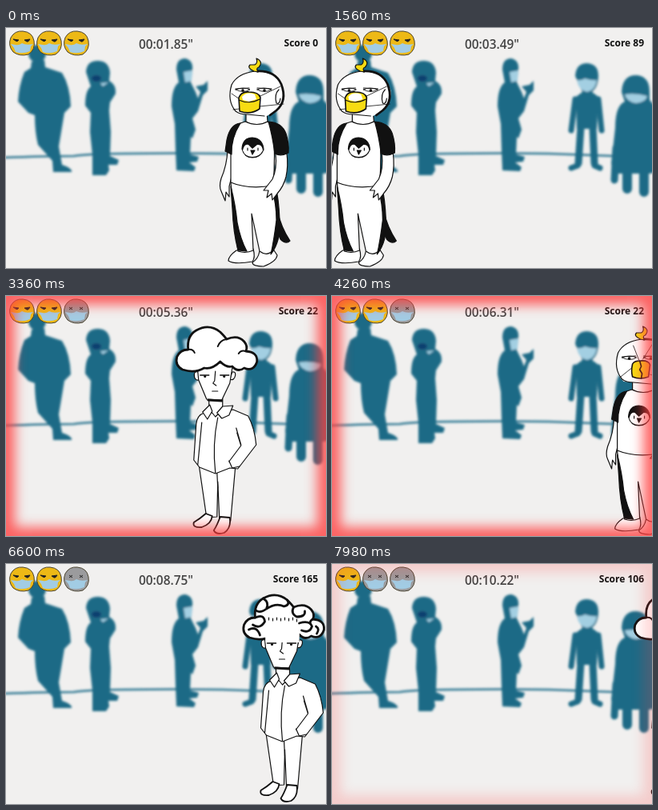
An HTML page for the animation above (8000 ms loop, 400 by 300 pixels).

```html
<!DOCTYPE html>
<html lang="en">
<head>
<meta charset="utf-8">
<title>Mask game</title>
<style>
  html, body { margin: 0; width: 100%; height: 100%; overflow: hidden; background: #f1f0ef; }
  svg { position: absolute; left: 0; top: 0; display: block; }
  #alarm { position: absolute; left: 0; top: 0; width: 400px; height: 300px; opacity: 0;
    box-shadow: inset 0 0 15px 11px rgba(255, 62, 62, .8); }
  text { font-family: "Open Sans", "Noto Sans", sans-serif; }
  .ink { fill: #fff; stroke: #111; stroke-width: 1.2; stroke-linejoin: round; stroke-linecap: round; }
  .line { fill: none; }
  .black { fill: #111; }
  .yellow { fill: #f7dc12; }
  .bold { stroke-width: 2.8; }
  .limb { fill: none; stroke: #1c6a86; stroke-linecap: round; stroke-linejoin: round; }
  .pale { fill: #a3cfe2; }
</style>
</head>
<body>
<svg width="400" height="300" viewBox="0 0 400 300">
  <defs>
    <filter id="soft" x="-5%" y="-5%" width="110%" height="110%"><feGaussianBlur stdDeviation="1.4"/></filter>

    <g id="birdBody" class="ink">
      <!-- tail, left arm -->
      <path class="black" d="M339 228 Q344 250 355 266 Q350 271 343 264 L337 250Z"/>
      <path d="M277 153 Q276 172 269 188 Q266 198 269 204 L274 216 L275 205 L279 211 L279 198 Q284 180 286 157Z"/>
      <!-- trousers, feet -->
      <path d="M288 278 Q278 285 278 291 Q286 296 308 292 Q312 287 309 276Z"/>
      <path d="M317 279 Q315 289 308 293 Q308 298 322 298 Q338 292 339 284 L333 275Z"/>
      <path d="M281 193 L284 228 L290 279 Q300 282 309 278 L307 232 L317 279 Q326 286 334 278 Q343 245 337 194Z"/>
      <path class="black" d="M281 198 Q287 222 289 243 Q293 264 301 279 L290 278 Q284 255 283 226Z"/>
      <path class="black" d="M332 198 Q338 220 338 240 Q335 265 331 283 Q344 266 342 240 Q341 214 337 198Z"/>
      <!-- shirt, right arm -->
      <path d="M300 105 L300 117 Q314 126 327 117 L326 105Z"/>
      <path d="M299 117 Q286 120 281 130 L281 193 Q302 202 334 197 Q337 160 334 122 L327 117 Q314 124 299 117Z"/>
      <path d="M337 157 Q339 176 333 189 L322 203 L328 203 L326 212 L332 207 L333 215 L339 207 Q347 198 350 186 Q353 172 351 157Z"/>
      <path class="black" d="M293 119 Q280 120 276 140 L274 154 L282 158 Q281 138 293 119Z"/>
      <path class="black" d="M328 117 Q345 118 350 132 Q354 145 353 156 Q344 161 336 157 Q333 134 328 117Z"/>
      <!-- chick badge -->
      <path class="black" d="M295 151 Q296 137 308 137 Q321 138 322 152 Q318 162 308 162 Q298 162 295 151Z"/>
      <path stroke="none" d="M296 153 Q298 144 303 146 L308 151 L314 146 Q320 145 321 153 Q317 161 308 161 Q299 161 296 153Z"/>
      <path class="black" d="M302 150 v3 M315 150 v3 M306 153 L311 153 L308 158Z"/>
    </g>

    <g id="birdHead" class="ink">
      <path stroke="none" d="M311 54 Q286 56 279 78 Q278 98 289 107 L326 110 Q350 99 348 78 Q341 54 311 54Z"/>
      <path class="line" d="M311 54 Q289 57 282 71 Q276 91 287 104 Q292 108 301 108 L323 110"/>
      <path class="line bold" d="M314 54 Q336 53 344 70 Q352 91 338 103 L330 109" />
      <path class="line" d="M341 77 Q335 83 338 94 Q342 96 343 88"/>
      <path class="yellow" d="M310 54 Q301 50 305 46 L311 46 Q315 44 313 38 Q322 42 316 49 Q312 50 315 55Z"/>
      <path stroke-width=".9" d="M287 77 Q296 73 305 77 Q297 82 287 77Z M314 77 Q322 73 332 77 Q323 82 314 77Z"/>
      <path class="line" d="M287 76 L304 75 M314 75 L332 76"/>
      <circle class="black" cx="296" cy="78" r="1.2"/><circle class="black" cx="323" cy="78" r="1.2"/>
    </g>

    <g id="masked" class="ink">
      <use href="#birdBody"/><use href="#birdHead"/>
      <path class="line" stroke-width=".8" d="M292 89 L282 82 M292 101 L284 102 M316 86 L343 73 M317 98 L347 95"/>
      <path class="yellow" stroke-width="1.6" d="M291 87 Q294 79 304 80 Q316 80 318 87 L317 101 Q306 109 292 104Z"/>
      <path d="M295 86 Q301 79 311 83 L313 89 L304 92 L296 90Z" stroke="none"/>
      <path class="line" d="M291 90 Q304 96 317 89"/>
    </g>

    <g id="bare" class="ink">
      <use href="#birdBody"/><use href="#birdHead"/>
      <path class="line" stroke-width=".8" d="M301 62 L308 80 M325 60 L313 79 M299 90 L284 102 M322 98 L340 104"/>
      <path class="yellow" stroke-width="1.6" d="M300 85 Q302 81 310 81 Q320 80 322 86 L320 101 Q310 105 300 101 Q298 94 300 85Z"/>
      <path class="line" stroke-width="1.6" d="M309 81 L311 88 L309 92 L312 97 L311 103"/>
    </g>

    <g id="manBody" class="ink" stroke-width="1">
      <!-- trousers, shoes -->
      <path d="M241 208 L251 277 L264 276 L265 232 L267 278 L281 281 L287 213Z"/>
      <path class="line" d="M264 220 L265 240"/>
      <path stroke-width="1.8" d="M250 272 Q242 279 235 283 Q233 290 245 289 Q257 285 258 275Z"/>
      <path stroke-width="1.8" d="M268 276 Q264 287 260 293 Q263 299 273 296 Q282 290 280 277Z"/>
      <!-- jacket -->
      <path d="M248 146 Q239 149 238 160 L235 205 L242 214 L262 222 L280 215 L290 216 L313 186 Q311 165 303 150 L284 142 L268 146Z"/>
      <path class="line" d="M245 158 L240 211 M289 171 L294 187 L279 207 M279 206 L283 215 L292 213 M265 152 Q258 185 262 221 M294 186 L288 165"/>
      <!-- neck, collar, face -->
      <path d="M254 128 L254 141 L262 151 L271 142 L271 128Z"/>
      <path d="M255 136 L246 145 L252 154 L258 144Z M271 138 L284 137 L279 149 L270 153 L264 146Z"/>
      <path d="M241 95 Q234 93 236 102 Q238 107 243 104Z M283 95 Q289 94 286 102 Q284 106 280 104Z"/>
      <path d="M239 84 L241 105 L251 129 L270 130 L280 109 L284 84Z"/>
      <path class="line bold" d="M253 130 L270 131"/>
      <path class="line" d="M262 94 L261 106 L259 109 L263 112 M258 119 L265 119"/>
      <path class="line" stroke-width="1.4" d="M243 99 L254 99 M268 99 L279 99"/>
      <circle class="black" cx="249" cy="100.500" r="1"/><circle class="black" cx="273" cy="100.500" r="1"/>
    </g>

    <path id="cloud" d="M221 92 Q211 87 214 76 Q218 67 228 67 Q226 50 238 43 Q254 34 268 45 Q274 51 276 54 Q290 48 298 57 Q303 63 300 69 Q315 70 314 82 Q310 95 298 90 Q290 96 283 88 Q276 90 268 82 Q258 92 248 90 Q236 97 221 92Z"/>
    <g id="plain" class="ink">
      <use href="#manBody"/><use href="#cloud" class="ink bold"/>
      <path class="line" stroke-width="2" d="M228 67 Q234 66 236 71 M276 54 Q268 55 265 63 M300 69 Q294 67 291 72"/>
    </g>
    <g id="curly" class="ink">
      <use href="#manBody"/><use href="#cloud" class="ink bold"/>
      <path stroke="none" d="M239 68 L284 68 L283 98 L241 98Z"/>
      <path class="line bold" d="M228 67 Q239 62 240 72 Q234 82 225 76 M238 43 Q246 48 242 56 Q234 62 229 58 M242 56 Q254 48 264 53 Q272 51 268 45 M276 54 Q272 62 280 66 Q291 66 290 59 M283 74 Q296 70 299 78 Q296 87 286 83 M300 69 Q294 72 299 78 M220 82 Q230 77 234 89 M304 78 Q309 81 305 87"/>
      <path class="line" d="M240 69 v3 M245 67 v3 M250 68 v3 M255 67 v3 M260 68 v3 M265 67 v3 M270 68 v3 M275 67 v3 M280 69 v3"/>
    </g>

    <g id="life">
      <path stroke="#4a4330" d="M-14 -7 Q-9 -16 1 -15 Q13 -14 15 -3 Q17 8 8 14 Q-3 17 -11 11 Q-18 3 -14 -7Z"/>
      <path fill="#a2cce4" d="M-14 1 L-8 2 Q-4 3 0 0 Q5 3 14 1 L11 4 L10 10 Q1 14 -8 11 L-10 6Z"/>
    </g>
    <path id="awake" fill="#222" stroke="#222" d="M-11 -5 L-4 -4 Q-6 -1 -8 -3Z M3 -4 L10 -5 Q8 -1 6 -2Z"/>
    <path id="out" fill="none" stroke="#222" d="M-9 -5 l4 3 m0 -3 l-4 3 M4 -5 l4 3 m0 -3 l-4 3"/>
  </defs>

  <rect width="400" height="300" fill="#f1f0ef"/>
  <g filter="url(#soft)" fill="#1c6a86">
    <path fill="none" stroke="#2b7590" stroke-width="2.6" d="M-4 162 Q50 160 85 160 Q105 157 150 157 Q215 156 270 157 L352 160"/>
    <!-- leaning -->
    <circle cx="39" cy="32" r="11"/>
    <path d="M32 42 L31 50 L23 55 Q16 72 15 92 L28 106 L36 109 Q36 130 40 146 L58 166 L59 180 L82 180 Q83 175 70 171 L66 148 L73 106 L81 98 Q80 72 70 56 L49 49 L48 40Z"/>
    <!-- on the phone -->
    <path d="M100 55 Q101 40 116 41 Q129 42 130 56 L129 66 Q138 71 137 82 L130 93 L129 103 L131 130 L130 160 L141 165 L139 171 L128 171 L129 178 L125 184 L108 184 L108 158 L105 130 L106 106 L99 97 Q99 78 106 73Z"/>
    <path class="pale" d="M118 69 L128 68 L121 73Z"/>
    <ellipse cx="113" cy="63" rx="6" ry="4" fill="#113f70"/>
    <!-- reading -->
    <path d="M213 52 Q213 38 224 38 Q234 40 233 52 L231 68 L237 80 L240 88 L243 80 L237 73 L247 71 L252 66 L252 78 L246 84 L240 104 L233 113 L237 127 L233 138 L231 136 L230 158 L241 161 L239 167 L229 168 L237 174 L235 179 L213 178 L212 153 L211 120 L207 98 Q207 74 216 68Z"/>
    <path class="pale" d="M222 55 L233 53 L232 66 L224 68Z"/>
    <!-- facing -->
    <path d="M304 60 Q305 44 319 44 Q333 45 333 60 Q333 73 325 80 L333 86 L331 126 L306 126 L305 86 L313 80Z"/>
    <path class="limb" stroke-width="7" d="M304 89 L299 128 M333 89 L337 128"/>
    <path class="limb" stroke-width="9" d="M311 124 L308 169 M326 124 L328 169"/>
    <path class="limb" stroke-width="7" d="M307 172 L299 175 M328 172 L335 175"/>
    <path class="pale" d="M306 65 Q312 66 316 63 Q325 66 331 65 Q329 78 319 80 Q308 78 306 65Z"/>
    <!-- edge of the crowd -->
    <path d="M362 80 Q363 59 380 59 Q397 60 397 80 L397 90 L406 100 L406 180 L397 182 L358 182 L349 170 L354 125 Q354 97 366 92Z"/>
    <path class="limb" stroke-width="9" d="M355 150 L353 190"/>
    <path class="limb" stroke-width="12" d="M369 175 L369 201 M390 175 L390 205"/>
    <path class="pale" d="M366 83 Q380 81 394 85 Q392 93 380 94 Q368 92 366 83Z"/>
  </g>

  <g id="actors">
    <use href="#masked"/><use href="#plain"/><use href="#bare"/><use href="#curly"/><use href="#plain"/>
  </g>

  <g id="lives">
    <g transform="translate(20 19)"><use href="#life"/><use/></g>
    <g transform="translate(54 19)"><use href="#life"/><use/></g>
    <g transform="translate(88 19)"><use href="#life"/><use/></g>
  </g>
  <text id="clock" x="200" y="26" font-size="15.400" font-weight="600" text-anchor="middle" fill="#444"></text>
  <text id="score" x="390" y="23" font-size="12" font-weight="700" text-anchor="end" fill="#111"></text>
</svg>
<div id="alarm"></div>

<script>
const LOOP = 8000, STEP = 60, RUSH = 0.00051;
const $ = id => document.getElementById(id);

// Each walker drifts left from x, then rushes off once tapped. "home" is its drawn position.
const walkers = [
  { home: 308, start: 0,    x: 308, speed: .08,  tap: 1018 },
  { home: 265, start: 1680, x: 430, speed: .083, tap: 3135 },
  { home: 308, start: 3900, x: 416, speed: .09,  tap: 4860 },
  { home: 265, start: 5650, x: 434, speed: .09,  tap: 7155 },
  { home: 265, start: 7890, x: 438, speed: .09,  tap: LOOP }
];
const scores = [0, 89, 22, 165, 106];
const losses = [3135, 7155];
const clockKeys = [[0, 1.85], [1560, 3.49], [3360, 5.36], [4260, 6.31], [5340, 7.43], [6600, 8.75], [7980, 10.22]];
const PULSE = 450, PULSES = 3;

const uses = [...$('actors').children];
const lives = [...$('lives').children];

function clockAt(t) {
  const i = Math.max(1, clockKeys.findIndex(k => k[0] >= t));
  const [t0, a] = clockKeys[i - 1], [t1, b] = clockKeys[i];
  return a + (b - a) * (t - t0) / (t1 - t0);
}

function draw(t) {
  walkers.forEach((w, i) => {
    const x = w.x - w.speed * (t - w.start) - RUSH * Math.max(0, t - w.tap) ** 2;
    uses[i].style.display = t >= w.start && x > -60 ? '' : 'none';
    uses[i].setAttribute('transform', `translate(${x - w.home} 0)`);
  });

  const lost = losses.filter(l => t >= l);
  lives.forEach((life, i) => {
    const gone = i >= lives.length - lost.length;
    life.setAttribute('fill', gone ? '#9b9b9d' : '#edb916');
    life.lastElementChild.setAttribute('href', gone ? '#out' : '#awake');
  });

  const since = lost.length ? t - lost[lost.length - 1] : Infinity;
  $('alarm').style.opacity = since < PULSE * PULSES ? Math.sin(Math.PI * since / PULSE) ** 2 : 0;

  $('clock').textContent = `00:${clockAt(t).toFixed(2).padStart(5, '0')}"`;
  $('score').textContent = 'Score ' + scores[walkers.filter(w => t >= w.tap).length];
}

const begin = performance.now();
function tick() {
  const t = Math.max(0, performance.now() - begin) % LOOP;
  draw(Math.floor(t / STEP) * STEP);
  requestAnimationFrame(tick);
}
tick();
</script>
</body>
</html>
```
